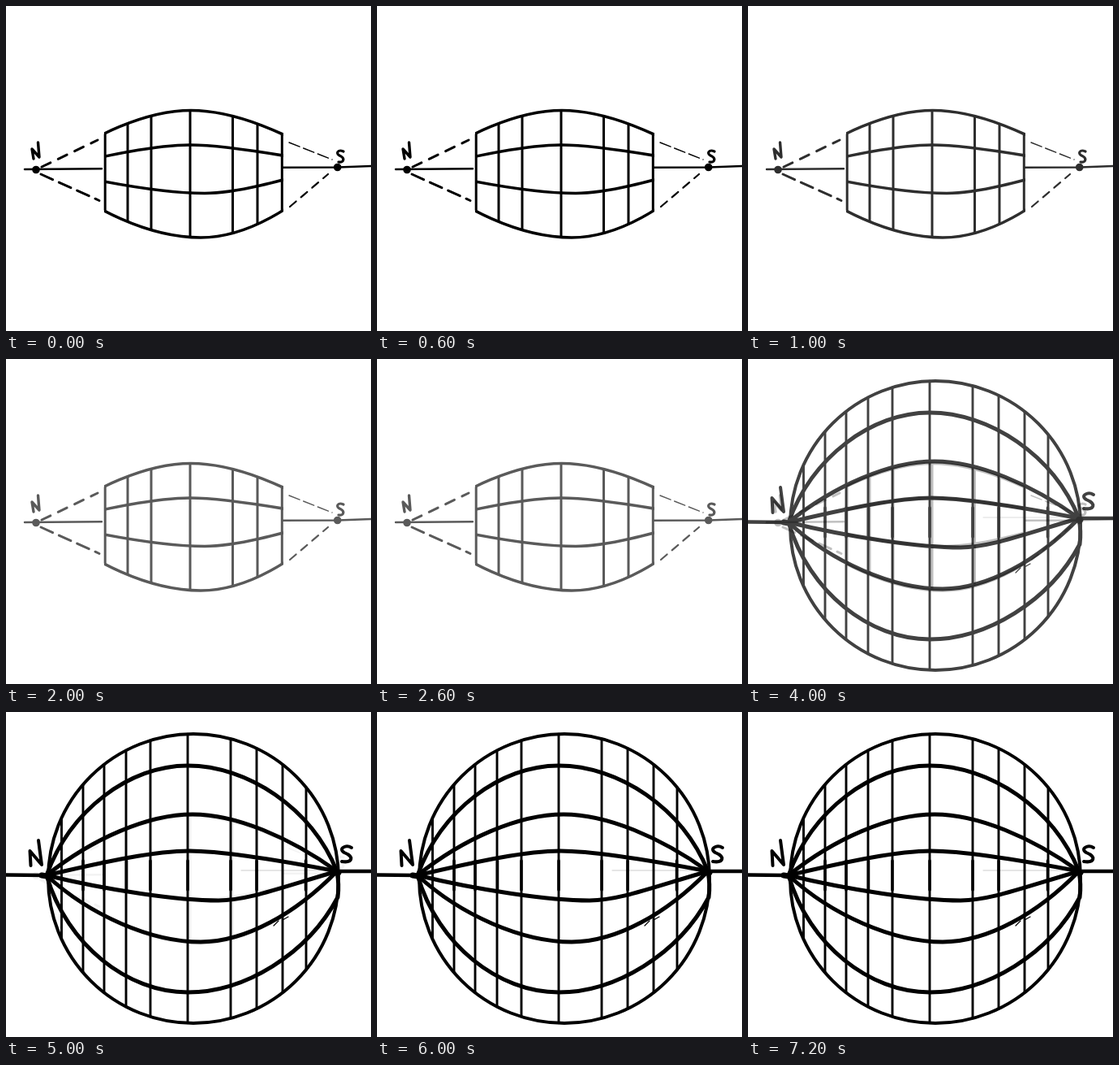
These frames come from a looping animation (450x400 px, 8000 ms). An HTML page:

```html
<!DOCTYPE html>
<html lang="en">
<head>
<meta charset="utf-8">
<title>Globe grid</title>
<style>
  html, body { margin: 0; width: 100%; height: 100%; overflow: hidden; background: #fff; }
  svg { display: block; width: 100vw; height: 100vh; }
  path, ellipse { fill: none; stroke: #000; stroke-linecap: round; stroke-linejoin: round; }
</style>
</head>
<body>
<svg viewBox="0 0 450 400">
  <clipPath id="band"><rect x="121" width="221" height="400"/></clipPath>
  <clipPath id="lens"></clipPath>
  <g id="globe"></g>
  <g id="barrel">
    <circle cx="37" cy="201.5" r="4.8"/><circle cx="408.7" cy="198.5" r="4.8"/>
    <g id="bands" clip-path="url(#band)"></g>
    <g id="staves" clip-path="url(#lens)"></g>
  </g>
</svg>
<script>
const [lens, globe, barrel, bands, staves] =
  ['lens', 'globe', 'barrel', 'bands', 'staves'].map(id => document.getElementById(id));
const north = [50, 201], south = [408, 196];

function stroke(group, width, d, dash = 'none') {
  const path = document.createElementNS('http://www.w3.org/2000/svg', 'path');
  path.setAttribute('d', d);
  path.setAttribute('stroke-width', width);
  path.setAttribute('stroke-dasharray', dash);
  group.append(path);
}

// Pole-to-pole curve, level at its peak; higher peaks leave the poles more steeply
function meridian(peakX, peakY, end = south) {
  const handles = ([x, y]) => {
    const rise = peakY - y, run = peakX - x;
    const reach = 90 - 0.45 * Math.abs(rise);
    const flat = 0.18 + 0.0017 * Math.abs(rise);
    return [[x + Math.sign(run) * reach, y + 0.6 * rise], [peakX - flat * run, peakY]];
  };
  const [n1, n2] = handles(north), [s1, s2] = handles(end);
  return `M${north}C${n1} ${n2} ${peakX} ${peakY}C${s2} ${s1} ${end}`;
}

// Globe
const center = { x: 231, y: 205, rx: 179, ry: 178 };
stroke(globe, 4, `M52 205a${center.rx} ${center.ry} 0 1 1 358 0a${center.rx} ${center.ry} 0 1 1 -358 0`);
for (const [x, y] of [[224, 66], [230, 126], [226, 171], [262, 232], [240, 283]])
  stroke(globe, 5, meridian(x, y));
stroke(globe, 5, meridian(224, 345, [409, 228]) + 'Q411 212 408 197');
for (const x of [68.5, 95, 121, 148, 178, 224, 277, 309, 341, 370]) {
  const half = center.ry * Math.sqrt(1 - ((x - center.x) / center.rx) ** 2);
  stroke(globe, 2.9, `M${x} ${center.y - half}V${center.y + half}`);
}
for (const x of [95, 121, 148.5, 178, 224, 277, 309, 369.5])
  stroke(globe, 3.5, `M${x} 183V219`);
stroke(globe, 4.4, 'M0 200.5L48 201M408 196H450');
stroke(globe, 7, 'M44 201L50 202M404 196L410 198');
stroke(globe, 1.2, 'M330 263l6 -6m5 -1l7 -4');
stroke(globe, 0.2, 'M290 195H400');
stroke(globe, 4, 'M30.5 189L29.5 171L44 188L40 158');
stroke(globe, 4, 'M426 167C419 163 409 168 417 173C430 178 427 186 414 184');

// Barrel: the middle of the same grid, with dashed cones to the poles
const hoops = [[228, 128.5], [227, 171], [245, 230.5], [240, 285]].map(([x, y]) => meridian(x, y));
hoops.forEach(hoop => stroke(bands, 3.5, hoop));
stroke(lens, 0, hoops[0]);
stroke(lens, 0, hoops[3]);
for (const x of [122.2, 150, 179, 227, 279.5, 310, 340.3])
  stroke(staves, 3, `M${x} 100V300`);
stroke(barrel, 2.4, 'M23 201L118 200.3M341 198.7L409 198.5L450 197');
stroke(barrel, 3, 'M44 198L113 165', '12 10.5');
stroke(barrel, 3, 'M43 207L115 239.5', '16 8.5');
stroke(barrel, 1.4, 'M349 168L402 189', '14 5');
stroke(barrel, 2.2, 'M350 247L397 207', '10 8');
stroke(barrel, 3.4, 'M34 188L32 176L41 186L39.5 168');
stroke(barrel, 3.2, 'M416 179C409 176 405 182 413 185C418 188 416 193 410 192');

// Opacity of [barrel, globe] for each second of the loop
const steps = [[1, 0], [0.82, 0], [0.65, 0], [0.65, 0.27], [0.25, 0.74], [0.05, 1], [0, 1], [0, 1]];

function draw(now) {
  const [barrelAlpha, globeAlpha] = steps[Math.floor(now / 1000) % steps.length];
  barrel.setAttribute('opacity', barrelAlpha);
  globe.setAttribute('opacity', globeAlpha);
  requestAnimationFrame(draw);
}
draw(performance.now());
</script>
</body>
</html>
```
